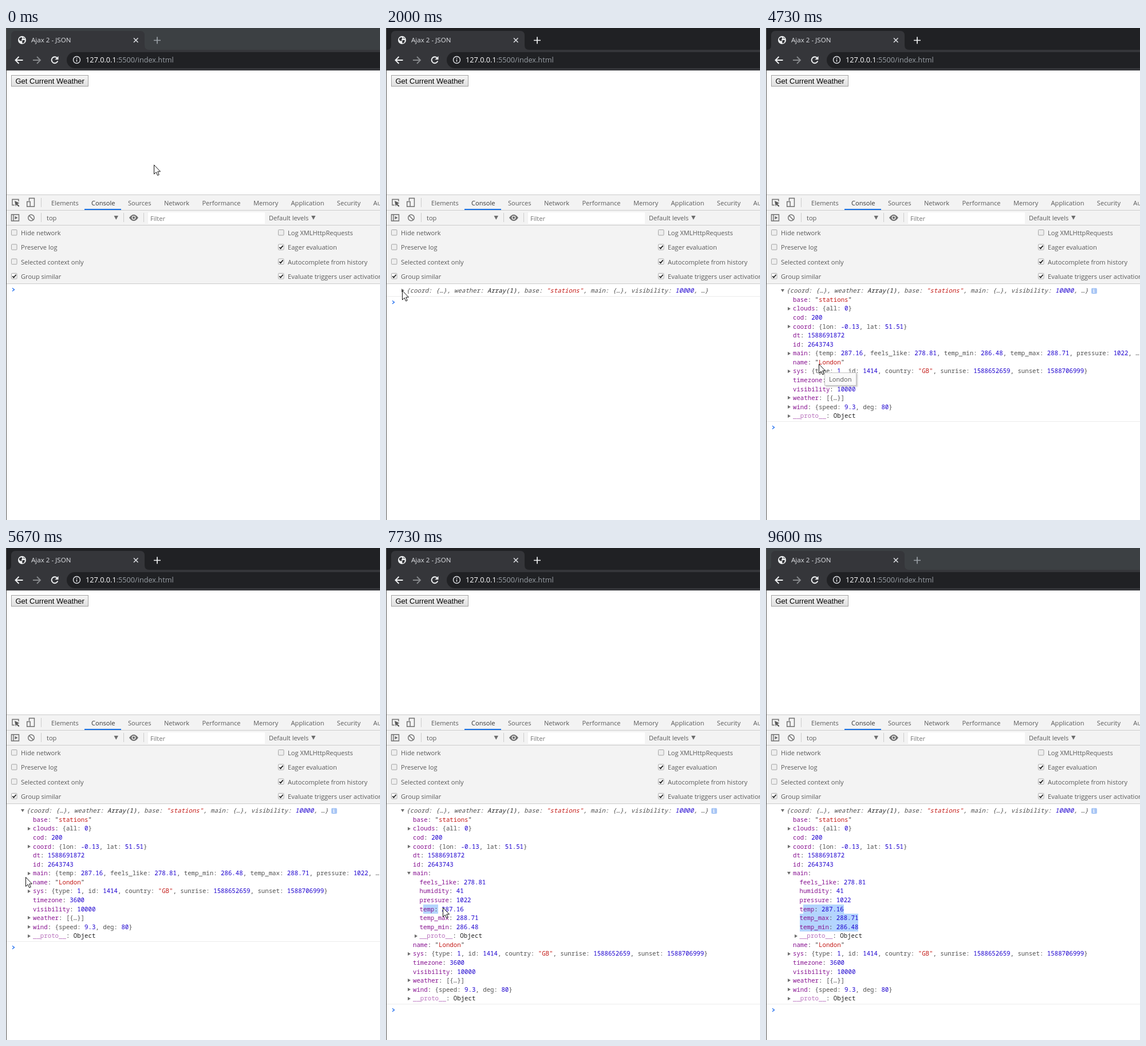
Recreate the animation shown at these times as an HTML page. Size 653x857 px, loop 9740 ms.

```html
<!DOCTYPE html>
<html lang="en">
<head>
<meta charset="utf-8">
<title>Ajax 2 - JSON</title>
<style>
  html, body { margin: 0; width: 100%; height: 100%; overflow: hidden; background: #fff; }
  #stage { position: relative; width: 653px; height: 857px; overflow: hidden; background: #fff; }
  #stage > svg { position: absolute; left: 0; top: 0; }
  text, .tip, #tabs { font: 11.1px "Open Sans", "Noto Sans", sans-serif; }
  .ui { fill: #5a5a5a; }
  .line { stroke: #ccc; fill: none; }
  .icon { stroke: #6e6e6e; stroke-width: 1.4; fill: none; }
  #strip { fill: #3c4043; }
  #plus { stroke: #9aa0a6; }
  .focus #strip { fill: #202124; }
  .focus #plus { stroke: #f1f3f4; }
  .hover #button { stroke: #777; }
  #tabs { position: absolute; left: 79px; top: 291px; display: flex; gap: 22.3px; line-height: 27px; color: #5a5a5a; }
  #tabs b { font-weight: normal; color: #333; }

  #console { position: absolute; top: 446px; left: 1px; width: 652px;
    font: 10.72px/15.58px "Noto Sans Mono", "DejaVu Sans Mono", monospace; color: #303030; }
  #message { padding: 4.2px 0 1px; border-bottom: 1px solid #ececec; }
  .row { position: relative; height: 15.58px; margin-left: var(--x); white-space: pre; }
  .fold::before { content: ""; position: absolute; left: -9px; top: 4.3px;
    border: solid transparent; border-width: 3.5px 0 3.5px 5.5px; border-left-color: #6e6e6e; }
  .open::before { left: -10px; top: 5px; border-width: 5.5px 3.5px 0; border-color: #6e6e6e transparent transparent; }
  .head { font-style: italic; }
  .key { color: #881391; }
  .dim { color: #b871bd; }
  .pre { color: #505050; }
  .str { color: #c41a16; }
  .num { color: #1c00cf; }
  .obj { color: #222; }
  .info { position: absolute; left: 532px; top: 3px; width: 10px; height: 10px; border-radius: 2px;
    background: #a9c7f5; color: #fff; font: bold 8px/10px "Noto Serif", serif; text-align: center; }
  .prompt { height: 19px; padding: 6px 0 0 9px; box-sizing: border-box; }
  .prompt svg { display: block; }
  .sel { position: absolute; height: 15.6px; background: #b4d5fe; }
  .tip { position: absolute; box-sizing: border-box; height: 23px; padding: 0 7px; line-height: 21px;
    color: #575757; background: #fafafa; border: 1px solid #c4c4c4; box-shadow: 2px 2px 2px #0003; }
  [hidden] { display: none; }
</style>
</head>
<body>
<div id="stage">
  <svg width="653" height="857">
    <rect id="strip" width="653" height="38"/>
    <path fill="#35363a" d="M0 38H653V74H0ZM1 38q8 0 8-8V13q0-8 8-8H234q8 0 8 8V30q0 8 8 8Z"/>
    <circle cx="28" cy="21" r="7" fill="#f1f3f4"/>
    <path fill="#35363a" d="M23 18l4-2 2 2-2 2 1 2-2 1-3-2ZM29 21l4 0-1 4-3 2-1-3ZM30 16l3 2-2 1Z"/>
    <text x="44" y="25" fill="#dfe1e5" style="font-size:11.6px">Ajax 2 - JSON</text>
    <path d="M223 17.5l7.5 7.5m0-7.5l-7.5 7.5" stroke="#dfe1e5" stroke-width="1.5"/>
    <path id="plus" d="M258 21.5h12M264 15.5v12" stroke-width="1.7"/>
    <g fill="none" stroke="#f1f3f4" stroke-width="1.9">
      <path d="M29.5 56H17M22.5 50l-6 6 6 6"/>
      <path d="M47 56h12.5M54 50l6 6-6 6" stroke="#85878a"/>
      <path d="M89.5 52.5a5.5 5.5 0 1 0 .8 5"/>
    </g>
    <path fill="#f1f3f4" d="M91.5 49v6h-6Z"/>
    <path fill="#202124" d="M653 42H120a14 14 0 0 0 0 28H653Z"/>
    <circle cx="123.5" cy="55.5" r="6" fill="none" stroke="#dfe1e5" stroke-width="1.4"/>
    <path d="M123.5 52v1.5m0 1.3v4" stroke="#dfe1e5" stroke-width="1.5"/>
    <text x="139" y="60" fill="#9aa0a6" style="font-size:12.7px"><tspan fill="#fff">127.0.0.1</tspan>:5500/index.html</text>

    <linearGradient id="face" x2="0" y2="1"><stop stop-color="#f6f6f6"/><stop offset="1" stop-color="#dedede"/></linearGradient>
    <rect id="button" x="9.5" y="82.5" width="134" height="19" fill="url(#face)" stroke="#a3a3a3"/>
    <text x="16.5" y="96.5" style="font:13px 'Liberation Sans',Arial,sans-serif">Get Current Weather</text>

    <rect y="291" width="653" height="155" fill="#f3f3f3"/>
    <path class="line" d="M0 290.5H653M0 317.5H653M0 343.5H653M0 445.5H653M61.5 296v16m0 10v16M205.5 322v16M240.5 322v16"/>
    <rect x="137" y="315" width="64" height="2" fill="#1a73e8"/>
    <path class="icon" d="M15 308.5H11V298.5H22V302M40.5 301V296.5H49.5V311H43M36.7 302.5h5.5v8.5h-5.5Z"/>
    <path fill="#5a5a5a" d="M15 301l8.5 4-3.5 1.2 3.5 3.8-1.5 1.5-3.7-3.8-1.3 3.3Z"/>
    <path class="icon" d="M9.5 325h13v11h-13ZM13 325v11"/>
    <path fill="#6e6e6e" d="M15.5 327.5l5 3-5 3ZM188.5 327h7.5l-3.75 7ZM533 327h7.5l-3.75 7Z"/>
    <circle class="icon" cx="44" cy="330.5" r="5.3"/><path class="icon" d="M40.3 326.8l7.4 7.4"/>
    <path fill="#6e6e6e" d="M215 330.5q8-11 16 0q-8 11-16 0Z"/>
    <circle cx="223" cy="330.5" r="2.8" fill="#6e6e6e" stroke="#f3f3f3" stroke-width="1.3"/>
    <rect x="248" y="321" width="204" height="20" fill="#fff"/>
    <g class="ui">
      <text x="71" y="334.5">top</text>
      <text x="252" y="335.5" fill="#757575">Filter</text>
      <text x="459" y="334.5">Default levels</text>
      <g id="options"></g>
    </g>
  </svg>

  <div id="tabs"><span>Elements</span><b>Console</b><span>Sources</span><span>Network</span><span>Performance</span><span>Memory</span><span>Application</span><span>Security</span><span>Audits</span></div>

  <div id="console">
    <div class="sel"></div><div class="sel"></div><div class="sel"></div>
    <div id="message"></div>
    <div class="prompt"><svg width="8" height="8"><path d="M1 1l3.5 2.7L1 6.5" fill="none" stroke="#367cf1" stroke-width="1.5"/></svg></div>
  </div>

  <div class="tip" style="left:116px;top:527px">Object</div>
  <div class="tip" style="left:102px;top:600px">London</div>
  <svg width="653" height="857">
    <rect width="1" height="857" fill="#555"/>
    <path id="cursor" d="M.5.5V16.5L4.2 13 6.7 18.7 9.2 17.6 6.8 12H11.5Z" fill="#fff" stroke="#111"/>
  </svg>
</div>

<script>
const $ = s => document.querySelector(s), $$ = s => [...document.querySelectorAll(s)];
const LOOP = 9740, FRAME = 1000 / 15, LINE = 15.58, CHAR = 6.43;

// Settings; a plus marks a ticked box
const options = [['Hide network', 'Log XMLHttpRequests'], ['Preserve log', '+Eager evaluation'],
  ['Selected context only', '+Autocomplete from history'], ['+Group similar', '+Evaluate triggers user activation']];

function checkbox(label, x, y) {
  const on = label[0] === '+';
  return `<rect x="${x + .5}" y="${y - 5}" width="9.5" height="9.5" rx="1" fill="${on ? '#fff' : '#eee'}" stroke="#a6a6a6"/>` +
    (on ? `<path d="M${x + 2.3} ${y}l2.2 2.3 4-5" fill="none" stroke="#222" stroke-width="1.8"/>` : '') +
    `<text x="${x + 17}" y="${y + 4.5}">${label.replace('+', '')}</text>`;
}
$('#options').innerHTML = options.map((pair, i) =>
  pair.map((label, j) => checkbox(label, 9 + j * 466, 356.5 + i * 25.3)).join('')).join('');

// Logged object; a plus marks a foldable row
const summary = '{coord: {…}, weather: Array(1), base: "stations", main: {…}, visibility: 10000, …}';
const before = ['base: "stations"', '+clouds: {all: 0}', 'cod: 200', '+coord: {lon: -0.13, lat: 51.51}',
  'dt: 1588691872', 'id: 2643743'];
const main = '+main: {temp: 287.16, feels_like: 278.81, temp_min: 286.48, temp_max: 288.71, pressure: 1022, …}';
const inner = ['feels_like: 278.81', 'humidity: 41', 'pressure: 1022', 'temp: 287.16', 'temp_max: 288.71',
  'temp_min: 286.48', '+__proto__: Object'];
const after = ['name: "London"', '+sys: {type: 1, id: 1414, country: "GB", sunrise: 1588652659, sunset: 1588706999}',
  'timezone: 3600', 'visibility: 10000', '+weather: [{…}]', '+wind: {speed: 9.3, deg: 80}', '+__proto__: Object'];

const span = (cls, s) => `<span class="${cls}">${s}</span>`;
const paint = s => s.replace(/("[^"]*")|(Array\(1\)|Object)|(-?\b[\d.]+)/g, (m, str, obj) =>
  span(str ? 'str' : obj ? 'obj' : 'num', m));

function row(line, x) {
  const [, fold, key, value] = line.match(/^(\+?)(\w+): (.*)$/);
  const text = value[0] === '"' ? `"${span('str', value.slice(1, -1))}"` : span('pre', paint(value));
  return `<div class="row${fold && ' fold'}" style="--x:${x}px">` +
    `${span(key[0] === '_' ? 'key dim' : 'key', key)}:${span('value', ' ' + text)}</div>`;
}
const rows = (lines, x) => lines.map(line => row(line, x)).join('');

$('#message').innerHTML =
  `<div class="row head fold" style="--x:34.5px">${span('pre', paint(summary))}<span class="info">i</span></div>` +
  `<div id="tree">${rows(before, 46)}<div id="main">${row(main, 46)}</div>` +
  `<div id="inner">${rows(inner, 57.5)}</div>${rows(after, 46)}</div>`;

// Pointer moves: from, to (ms), x, y
const moves = [
  [0, 0, 258, 238], [0, 530, 100, 92], [1135, 1730, 24, 476], [1730, 2000, 28, 457],
  [2470, 3270, 106, 519], [3470, 4000, 186, 620], [4000, 4470, 96, 656], [4470, 4670, 92, 585],
  [5400, 5667, 34, 573], [5667, 6130, 38, 566], [6535, 6870, 85, 651], [7005, 7470, 64, 628],
  [7600, 7733, 99, 626], [7733, 8470, 186, 664], [8935, 9333, 102, 870]
];
const clamp = (v, lo, hi) => Math.max(lo, Math.min(hi, v));
const ramp = (t, a, b) => clamp((t - a) / (b - a || 1), 0, 1);
const within = (t, a, b) => t >= a && t < b;

function pointer(t) {
  let [, , x, y] = moves[0];
  for (const [a, b, toX, toY] of moves.slice(1)) {
    const f = (1 - Math.cos(Math.PI * ramp(t, a, b))) / 2;
    x += (toX - x) * f;
    y += (toY - y) * f;
  }
  return [Math.round(x), Math.round(y)];
}

const stage = $('#stage'), tree = $('#tree'), head = $('.head'), mainRow = $('#main .row'),
  sels = $$('.sel'), [objectTip, cityTip] = $$('.tip');
const picked = inner.slice(3, 6);

// The selection trails the dragged pointer and snaps to characters
function select(t) {
  const [x, y] = pointer(Math.min(t - 40, 8900)), at = Math.floor((y - 621.4) / LINE);
  sels.forEach((el, i) => {
    const from = i ? 0 : 1, end = picked[i].length;
    const to = i < at ? end : i > at ? from : clamp(Math.round((x - 58.5) / CHAR), from, end);
    el.hidden = t < 7600;
    el.style.left = 57.5 + from * CHAR + 'px';
    el.style.top = 175.4 + i * LINE + 'px';
    el.style.width = (to - from) * CHAR + 'px';
  });
}

function draw(t) {
  const listed = t >= 2190, expanded = t >= 6260;
  stage.classList.toggle('focus', within(t, 590, 9590));
  stage.classList.toggle('hover', within(t, 450, 1240));
  $('#message').hidden = t < 725;
  tree.hidden = !listed;
  head.classList.toggle('open', listed);
  $('.info').hidden = !listed;
  mainRow.classList.toggle('open', expanded);
  $('#main .value').hidden = expanded;
  $('#inner').hidden = !expanded;
  objectTip.style.opacity = t < 3525 ? ramp(t, 3290, 3560) : 0;
  cityTip.style.opacity = t < 5460 ? ramp(t, 4630, 4725) : 0;
  select(t);
  $('#cursor').setAttribute('transform', `translate(${pointer(t)})`);
}

// The picture is refreshed 15 times a second
const start = performance.now();
function tick() {
  const t = (performance.now() - start) % LOOP;
  draw(Math.floor((t + 5) / FRAME) * FRAME);
  requestAnimationFrame(tick);
}
tick();
</script>
</body>
</html>
```
